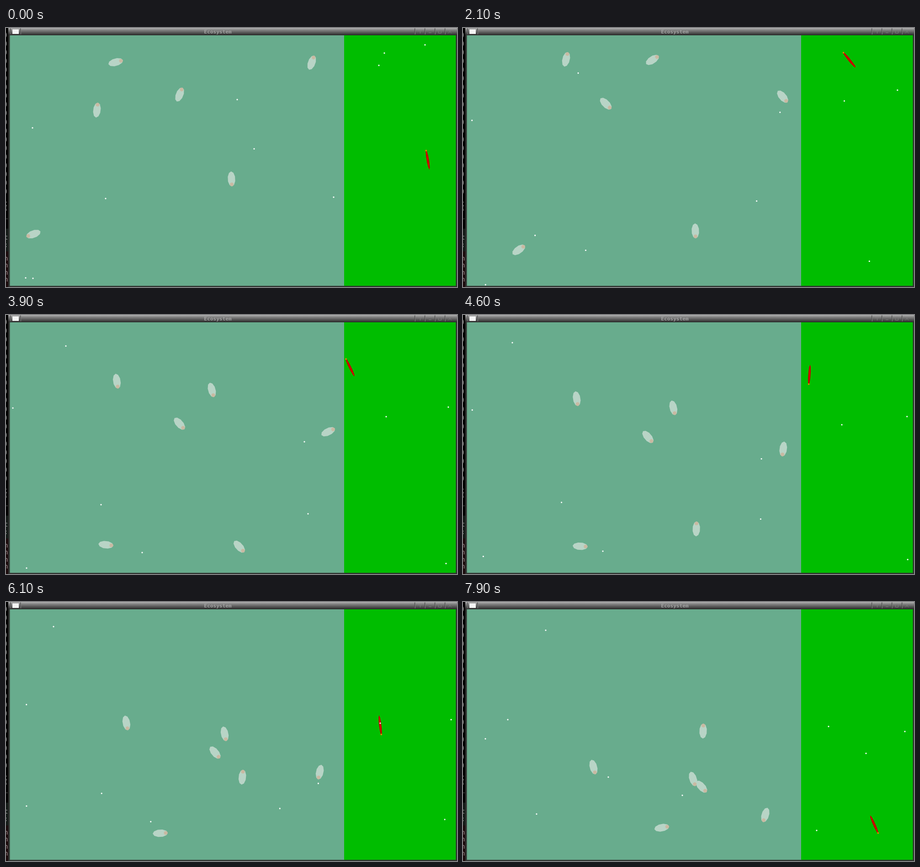
Recreate the animation shown at these times as an HTML page with a canvas. Size 987 by 568 pixels, loop 8000 ms.

```html
<!DOCTYPE html>
<html lang="en">
<head>
<meta charset="utf-8">
<title>Ecosystem</title>
<style>
html, body { margin: 0; width: 987px; height: 568px; overflow: hidden; background: #000; }
canvas { display: block; }
</style>
</head>
<body>
<canvas id="stage" width="987" height="568"></canvas>
<script>
const ctx = document.getElementById('stage').getContext('2d');
const LOOP = 7.9;

// Waypoints: seconds, x, y, heading in degrees, and a new heading where it turns sharply
const fish = [
  [[0, 240, 75, -15], [2.1, 312.5, 166, 45], [7.9, 522, 405, 48]],
  [[0, 380, 146, -68], [2.1, 414.5, 70, -33, 62], [7.9, 503.5, 388, 72]],
  [[0, 199, 180, -83], [2.3, 228, 58, -78, 80], [7.9, 285.5, 362, 75]],
  [[0, 669, 76, -70], [2.1, 699.5, 150.5, 50], [3.9, 705, 256, -26, 95], [7.9, 661.5, 467, 107]],
  [[0, 60, 452, 160], [0.8, 31, 469, 184, 6], [2.1, 122, 486.5, -35, 14], [7.9, 435, 495, -11]],
  [[0, 493.5, 331, 87], [2.1, 508.5, 445, 88], [3.9, 510.5, 508, 48, -92], [7.9, 525.5, 283, -88]]
];
const hunter = [[0, 923, 289, -100], [2.1, 845.5, 70, -129], [3.9, 753, 115, -116, -64],
  [5.3, 782, 200.5, 25], [6.8, 837, 348, 60], [7.9, 900, 488, 66]];

// Each speck drifts on a curve through its start, middle and end
const specks = [
  [[58, 219], [15, 204], [98, 258]],
  [[506, 157], [131, 68], [181, 62]],
  [[543, 265], [661, 436], [480, 424]],
  [[218, 374], [298, 521], [318, 384]],
  [[717, 371], [963, 545], [882, 332]],
  [[43, 548], [208, 416], [161, 465]],
  [[59, 549], [45, 555], [49, 300]],
  [[917, 37], [968, 202], [967, 284]],
  [[828, 55], [832, 223], [800, 273]],
  [[816, 82], [653, 278], [774, 501]]
];

const rad = deg => deg * Math.PI / 180;

// Cubic from a to b with end slopes m and n; returns value and slope
function hermite(a, b, m, n, u) {
  const c = 3 * (b - a) - 2 * m - n, d = 2 * (a - b) + m + n;
  return [a + u * (m + u * (c + u * d)), m + u * (2 * c + u * 3 * d)];
}

function pose(path, speed, t) {
  const i = Math.max(1, path.findIndex(p => p[0] >= t));
  const [t0, x0, y0, inward, out = inward] = path[i - 1];
  const [t1, x1, y1, end] = path[i];
  const push = speed * (t1 - t0), u = (t - t0) / (t1 - t0);
  const [x, dx] = hermite(x0, x1, push * Math.cos(rad(out)), push * Math.cos(rad(end)), u);
  const [y, dy] = hermite(y0, y1, push * Math.sin(rad(out)), push * Math.sin(rad(end)), u);
  return [x, y, Math.atan2(dy, dx)];
}

function speckAt([a, b, c], t) {
  const u = t / LOOP, mid = 3.9 / LOOP;
  const wa = (u - mid) * (u - 1) / mid;
  const wb = u * (u - 1) / (mid * (mid - 1));
  const wc = u * (u - mid) / (1 - mid);
  const at = (k, lo, hi) => Math.max(lo, Math.min(hi, wa * a[k] + wb * b[k] + wc * c[k]));
  return [at(0, 11, 981), at(1, 18, 563)];
}

function rect(x, y, w, h, color) {
  ctx.fillStyle = color;
  ctx.fillRect(x, y, w, h);
}

function oval(x, y, rx, ry, color, sides = 10) {
  ctx.beginPath();
  for (let k = 0; k < sides; k++) {
    const a = k * 2 * Math.PI / sides;
    ctx.lineTo(x + rx * Math.cos(a), y + ry * Math.sin(a));
  }
  ctx.fillStyle = color;
  ctx.fill();
}

function creature([x, y, angle], rx, ry, body, headX, headR, head) {
  ctx.save();
  ctx.translate(x, y);
  ctx.rotate(angle);
  oval(0, 0, rx, ry, body);
  oval(headX, 0, headR, headR, head);
  ctx.restore();
}

function terminalEdge() {
  rect(0, 0, 5, 568, '#000');
  rect(0, 440, 5, 50, '#151b18');
  rect(0, 490, 5, 78, '#1c0b0d');
  ctx.save();
  ctx.beginPath();
  ctx.rect(0, 0, 4, 568);
  ctx.clip();
  ctx.font = '14px "DejaVu Sans Mono", monospace';
  ctx.textAlign = 'left';
  ctx.fillStyle = '#999';
  for (let y = 20; y < 370; y += 19.05) ctx.fillText(')', -4, y);
  [...'.(_t;'].forEach((s, i) => ctx.fillText(s, -4, (i < 3 ? 383 : 416) + i * 16));
  ctx.fillStyle = '#a09092';
  for (let y = 510; y < 560; y += 15.3) ctx.fillText('h', -4, y);
  ctx.restore();
}

function titleBar() {
  const shade = ctx.createLinearGradient(0, 0, 0, 16);
  ['#b4b4b4', '#868686', '#686868', '#484848', '#282828']
    .forEach((c, i) => shade.addColorStop(i / 4, c));
  rect(5, 0, 982, 16, shade);
  for (const x of [10, 32, 895, 917, 939, 961]) {
    rect(x - 1, 1, 1, 13, '#4a4a4a');
    rect(x, 1, 1, 13, '#808080');
  }
  rect(14, 3, 14, 10, '#f4f4f4');

  ctx.strokeStyle = '#7c7c7c';
  ctx.lineWidth = 1;
  ctx.stroke(new Path2D('M902 6.5h8M906.5 6v6M925 10.5h6M946.5 4.5h6v7h-6zM968 4.5l7 7m0-7l-7 7'));

  ctx.font = 'bold 11.2px "DejaVu Sans Mono", monospace';
  ctx.textAlign = 'center';
  ctx.fillStyle = '#a0a0a0';
  ctx.fillText('Ecosystem', 463.5, 12);
}

function draw(t) {
  rect(0, 0, 987, 568, '#303230');
  terminalEdge();
  titleBar();
  rect(8.5, 16, 732, 549.5, '#68ac8d');
  rect(740, 16, 244.5, 549.5, '#00bd00');

  ctx.save();
  ctx.beginPath();
  ctx.rect(8.5, 16, 976, 549.5);
  ctx.clip();
  for (const path of fish) creature(pose(path, 55, t), 16.5, 8.3, '#b8d4c6', 12, 4.2, '#c9b9a2');
  creature(pose(hunter, 115, t), 22, 2.7, '#c80000', 20.5, 1.9, '#e08400');
  for (const s of specks) oval(...speckAt(s, t), 1.6, 1.6, '#fff');
  ctx.restore();
}

const start = performance.now();
function frame() {
  const tick = Math.floor((performance.now() - start) / 100) % 80;
  draw(tick / 10);
  requestAnimationFrame(frame);
}
frame();
</script>
</body>
</html>
```
